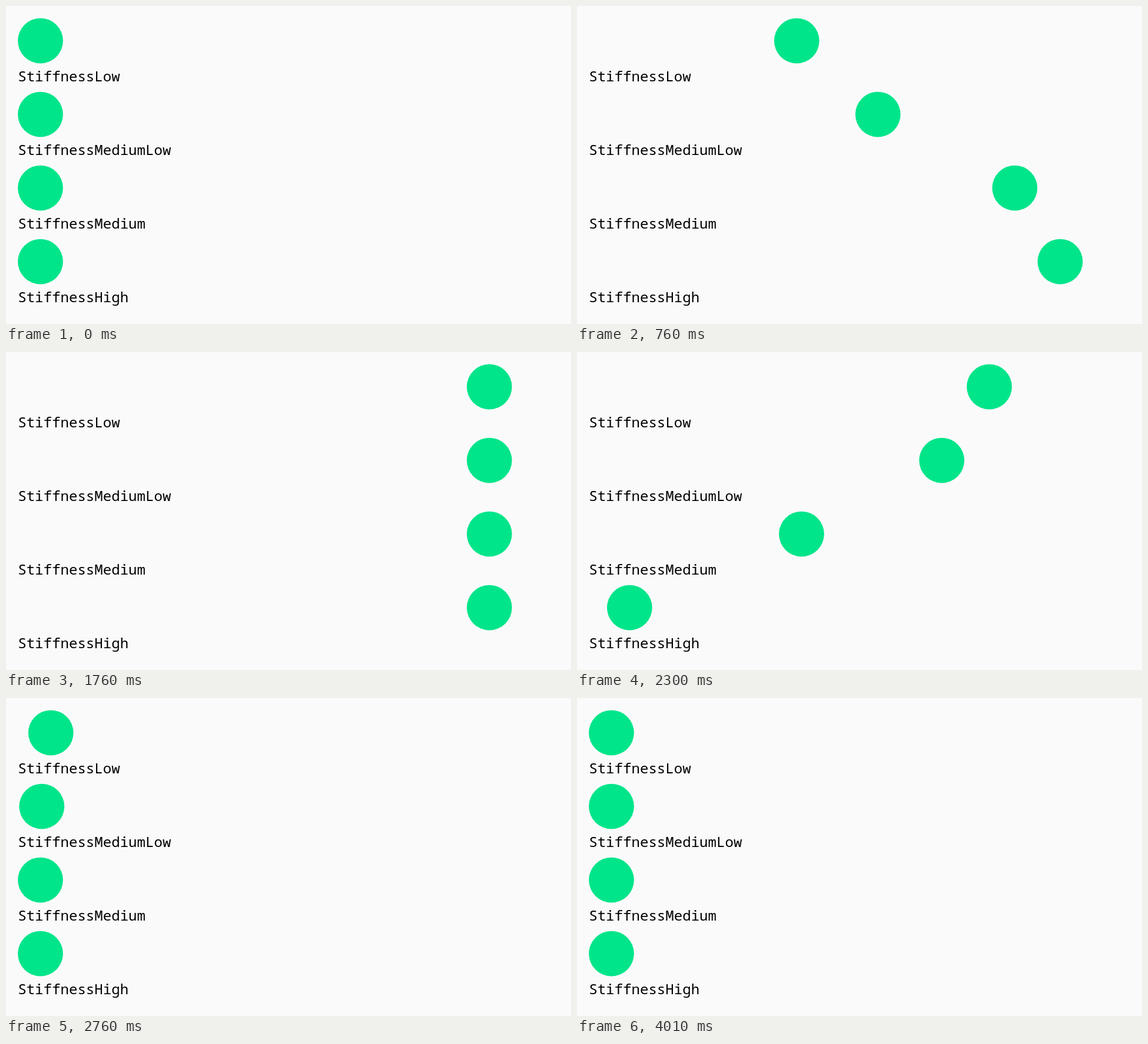
Animation, 960 px wide and 540 px high, one loop 4030 ms. Source, as an HTML page:

```html
<!DOCTYPE html>
<html lang="en">
<head>
<meta charset="utf-8">
<title>Spring stiffness</title>
<style>
  html, body { margin: 0; width: 100%; height: 100%; overflow: hidden; background: #fafafa; }
  svg { display: block; width: 960px; height: 540px; }
  circle { fill: #00e58a; }
  text { font: 24.1px 'Roboto Mono', 'Noto Sans Mono', monospace; fill: #000; }
</style>
</head>
<body>
<svg id="stage" viewBox="0 0 960 540"></svg>
<script>
const LOOP = 4030, STEP = 20;
const LEFT = 58.5, TRAVEL = 762.8, RADIUS = 38.4, ROW = 125;

// Each leg: start in ms, and spring time elapsed per ms of playback.
const OUT = { start: 646.7, rate: 0.882 };
const BACK = { start: 2234.3, rate: 0.761 };

const SPRINGS = [
  ['StiffnessLow', 200],
  ['StiffnessMediumLow', 400],
  ['StiffnessMedium', 1500],
  ['StiffnessHigh', 10000],
];

const stage = document.getElementById('stage');

function add(name, attrs, content = '') {
  const node = document.createElementNS(stage.namespaceURI, name);
  for (const key in attrs) node.setAttribute(key, attrs[key]);
  node.textContent = content;
  return stage.appendChild(node);
}

const balls = SPRINGS.map(([label, stiffness], i) => {
  add('text', { x: 20.2, y: 127.7 + i * ROW }, label);
  const node = add('circle', { cx: LEFT, cy: 59.1 + i * ROW, r: RADIUS });
  return { node, omega: Math.sqrt(stiffness) };
});

// Critically damped spring, going from 0 to 1.
function spring(omega, { start, rate }, time) {
  const u = omega * Math.max(0, time - start) * rate / 1000;
  return 1 - (1 + u) * Math.exp(-u);
}

function draw(time) {
  for (const { node, omega } of balls) {
    const progress = spring(omega, OUT, time) - spring(omega, BACK, time);
    node.setAttribute('cx', (LEFT + TRAVEL * progress).toFixed(2));
  }
}

const origin = performance.now();

function tick(now) {
  const time = Math.max(0, now - origin) % LOOP;
  draw(Math.floor((time + 4) / STEP) * STEP);
  requestAnimationFrame(tick);
}

draw(0);
requestAnimationFrame(tick);
</script>
</body>
</html>
```
